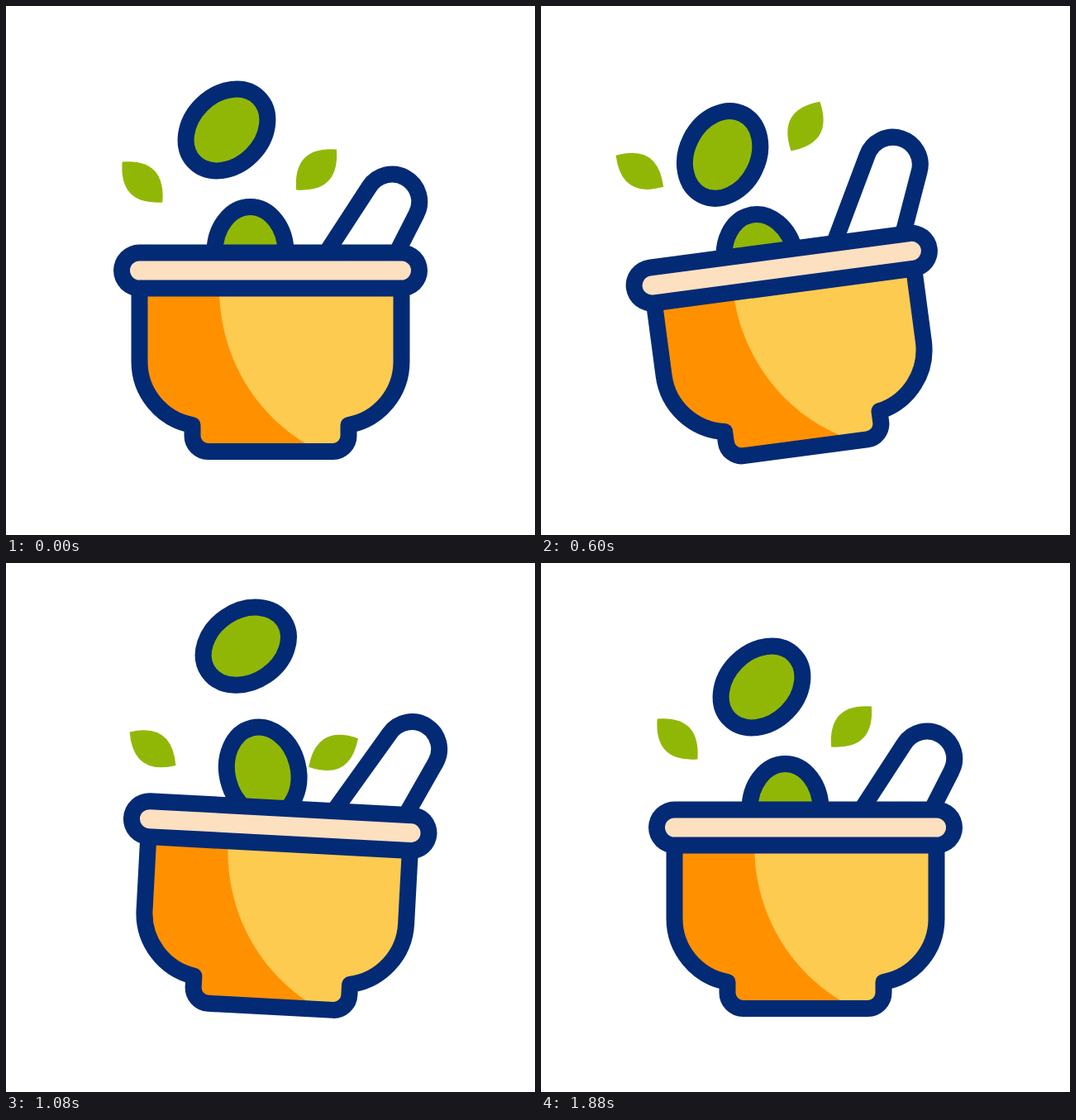
An HTML page for the animation above (2.04 s loop, 640 px wide and 640 px high).

```html
<!DOCTYPE html>
<html lang="en">
<head>
<meta charset="utf-8">
<title>Mortar and pestle</title>
<style>
  html, body { margin: 0; width: 100%; height: 100%; overflow: hidden; background: #fff; }
  svg { display: block; width: 100%; height: 100%; }
  .line { stroke: #032a75; stroke-width: 20; stroke-linejoin: round; }
  .green { fill: #91b706; }
</style>
</head>
<body>
<svg viewBox="0 0 640 640">
  <g id="rig">
    <g id="low"><ellipse class="line green" rx="43" ry="55"/></g>
    <g id="high"><ellipse class="line green" rx="43" ry="55"/></g>
    <g id="leafL"><path class="green" d="M-34.5 0Q0-40 34.5 0Q0 40-34.5 0"/></g>
    <g id="leafR"><path class="green" d="M-34.5 0Q0-40 34.5 0Q0 40-34.5 0"/></g>
    <g id="pestle"><path class="line" fill="#fff" d="M-139 153L-27.7-18A33 33 0 0 1 29.4 15L-41 153"/></g>
    <path fill="#fdcb50" d="M161.5 330V430A78 78 0 0 0 225.5 507V520A19 19 0 0 0 244.5 539H395.5A19 19 0 0 0 414.5 520V507A78 78 0 0 0 478.5 430V330"/>
    <path fill="#ff9100" d="M161.5 330V430A78 78 0 0 0 225.5 507V520A19 19 0 0 0 244.5 539H378L362 529C298 490 258 420 258 341V330"/>
    <path class="line" fill="none" d="M161.5 330V430A78 78 0 0 0 225.5 507V520A19 19 0 0 0 244.5 539H395.5A19 19 0 0 0 414.5 520V507A78 78 0 0 0 478.5 430V330"/>
    <g stroke-linecap="round">
      <path stroke="#032a75" stroke-width="63" d="M161.5 320H478.5"/>
      <path stroke="#fde0c0" stroke-width="23" d="M161.5 320H478.5"/>
    </g>
  </g>
</svg>
<script>
const LOOP = 2040, STEP = 40;

// Monotone cubic curve through the keys, at rest at both ends and at peaks
function curve(times, values, t) {
  const last = times.length - 1;
  if (t >= times[last]) return values[last];
  const slope = i => (values[i + 1] - values[i]) / (times[i + 1] - times[i]);
  const tangent = i => {
    if (i === 0 || i === last) return 0;
    const a = slope(i - 1), b = slope(i);
    return a * b <= 0 ? 0 : 2 * a * b / (a + b);
  };
  let i = 0;
  while (t >= times[i + 1]) i++;
  const span = times[i + 1] - times[i], u = (t - times[i]) / span, v = 1 - u;
  return v * v * (1 + 2 * u) * values[i] + u * u * (3 - 2 * u) * values[i + 1]
    + span * u * v * (v * tangent(i) - u * tangent(i + 1));
}

const tilt = [[0, 460, 760, 945, 1120, 1240, 1440, 1560, 1680, 1790, 1880],
              [0, -10.9, -0.55, 7, 2, 0.55, -3, -2, -0.8, 1, 0]];
const lift = [[0, 440, 760, 805, 920, 1230, 1560, 1880],
              [0, -34, 35.5, 40, 22, -14.5, 0, 0]];

// Offsets from the resting place, relative to the tilting bowl
const times = [0, 440, 760, 920, 1080, 1240, 1560, 1740, 1880];
const parts = {
  high: { at: [267, 150, 45],
    y: [27, 18, -28.6, -45, 3, 15, 5], turn: [-2, -19, -13, 8, 29, 1, 0] },
  low: { at: [295.5, 298, 0],
    y: [33, -32, -61, -42, 15, 7, 2], turn: [-19, 11, -7, -17, -23, -2, 0] },
  leafL: { at: [165, 213, 45], x: [-7, 7, -2, -4, -6, 0, 0],
    y: [-54, 8.5, 52.6, 22, -10, -18.6, -6], turn: [-20.6, 12.5, -6, -12, -16, 0, 0] },
  leafR: { at: [375.5, 198, -45], x: [0, -9, -5.5, 4, 11.5, 0, 0],
    y: [-58, -16, 34, 30, 18, -29, -10], turn: [1, -15, -10, 12, 29.5, 1, 0] },
  pestle: { at: [467, 237, 0], x: [9.3, -4, 1.2, 7, 14.5, 1.3, 6],
    y: [-32.8, -11, -7.2, -18, -30, -8, -12], turn: [-4.7, -5, -1, -0.5, 0, -0.8, 0] }
};

const place = (id, transform) =>
  document.getElementById(id).setAttribute("transform", transform);

function draw(t) {
  place("rig", `translate(0 ${curve(...lift, t)}) rotate(${curve(...tilt, t)} 320 539)`);
  for (const [id, { at, x, y, turn }] of Object.entries(parts)) {
    const [px, py, angle] = [x, y, turn].map((keys, i) =>
      at[i] + (keys ? curve(times, [0, ...keys, 0], t) : 0));
    place(id, `translate(${px} ${py}) rotate(${angle})`);
  }
}

const start = performance.now();
function tick() {
  const t = (performance.now() - start) % LOOP;
  draw(Math.floor(t / STEP) * STEP);
  requestAnimationFrame(tick);
}
tick();
</script>
</body>
</html>
```
